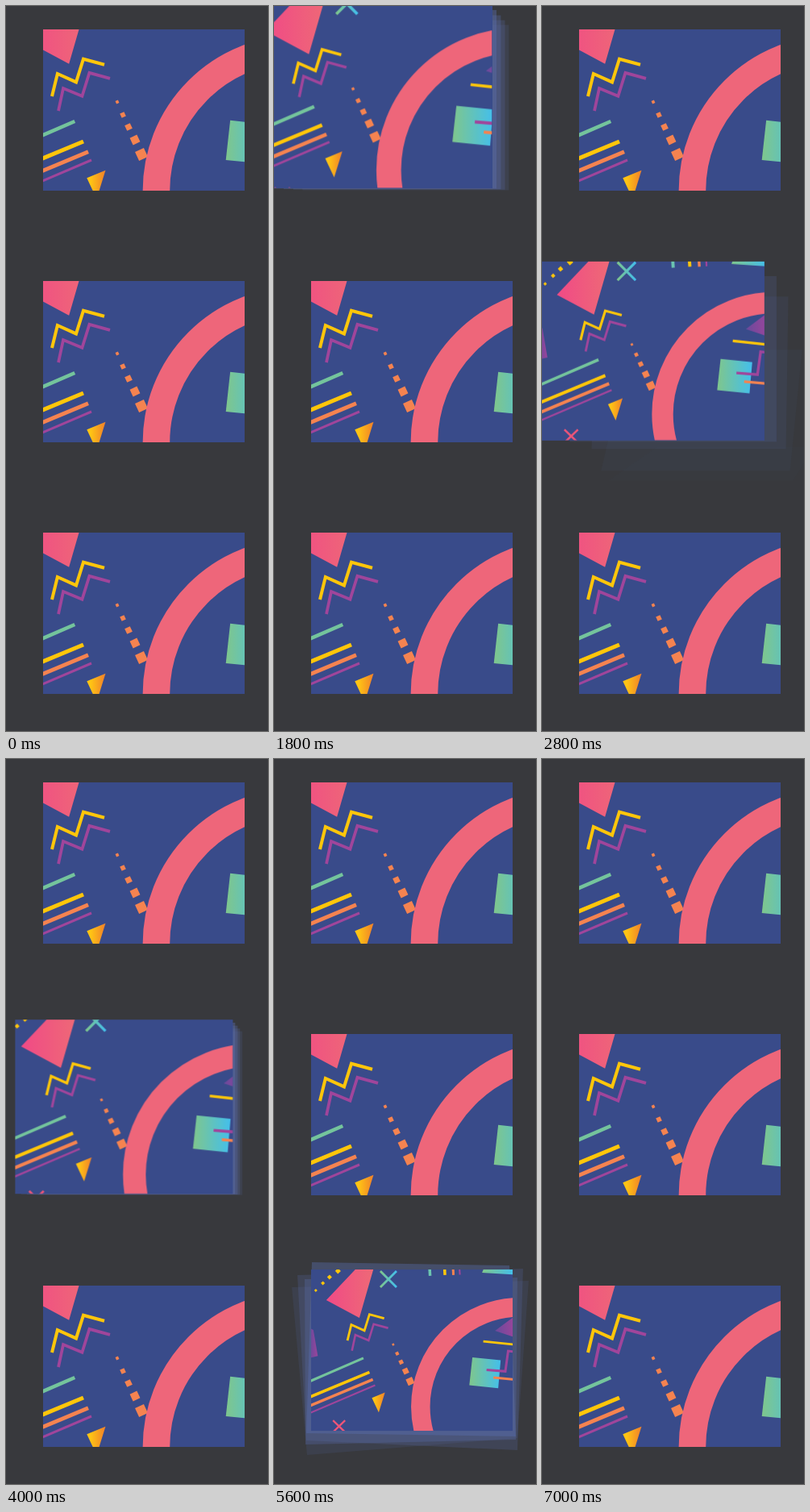
An HTML page for the animation above (7100 ms loop, 325 by 899 pixels).

```html
<!DOCTYPE html>
<html lang="en">
<head>
<meta charset="utf-8">
<title>Stack hover effects</title>
<style>
html, body { margin: 0; width: 100%; height: 100%; overflow: hidden; background: #38393d; }
#stage { position: fixed; inset: 0; overflow: hidden; contain: strict; }
.stack { position: absolute; left: 46px; width: 250px; height: 200px; perspective: 1000px; perspective-origin: 438px 225px; }
.deco, .card { position: absolute; inset: 0; }
.deco { background: #5a6eb0; opacity: 0; }
.card { overflow: hidden; background: #394b8a; }
svg { position: absolute; left: 0; top: 0; display: block; }
.fan { overflow: visible; fill: #5a6eb0; }
.line { fill: none; }
</style>
</head>
<body>
<div id="stage">
<svg width="0" height="0">
  <defs>
    <linearGradient id="pink"><stop stop-color="#f04a86"/><stop offset="1" stop-color="#ee6a76"/></linearGradient>
    <linearGradient id="sea"><stop stop-color="#7fc68c"/><stop offset="1" stop-color="#43bfec"/></linearGradient>
    <linearGradient id="sun"><stop offset=".2" stop-color="#ffc414"/><stop offset="1" stop-color="#f0802a"/></linearGradient>
    <linearGradient id="plum"><stop stop-color="#6a4a9c"/><stop offset="1" stop-color="#9a459b"/></linearGradient>
    <g id="art">
      <path fill="url(#pink)" d="M19 38L55 0 56-4H78.5L77.3 0 60 60Z"/>
      <g id="dots" fill="#ffc60a"></g>
      <g class="line" stroke="#ffc60a" stroke-width="2.8">
        <path d="M45.2 88.1L50 68.5 66.2 75.8 72.5 55.7 90.7 60.6"/>
        <path d="M213.5 89L254 93.3"/>
      </g>
      <g class="line" stroke="#a0459b" stroke-width="2.6">
        <path d="M50.8 100.7L55 81.1 71.4 87.9 77.7 67.7 95.6 72.6"/>
      </g>
      <g id="squares" fill="#f58350"></g>
      <path class="line" stroke="#74c49c" stroke-width="3.2" d="M-5 140L65 109.8"/>
      <path class="line" stroke="#ffc60a" stroke-width="3.5" d="M-5 159.5L72.5 127.3"/>
      <path class="line" stroke="#f58350" stroke-width="3.5" d="M-5 170.3L76.7 136.2"/>
      <path class="line" stroke="#a0459b" stroke-width="2.1" d="M-5 179.5L79.5 143.4"/>
      <path fill="url(#sun)" d="M75.5 159L91.7 152.3 84 177Z"/>
      <path fill="url(#plum)" d="M228 76L252 58V84Z"/>
      <path fill="url(#plum)" d="M-1 73L3 75 8.5 107.3-1 109.5Z"/>
      <circle class="line" cx="259" cy="170" r="123.2" stroke="#ee667a" stroke-width="23.5"/>
      <path fill="url(#sea)" d="M200 109L235 112.5 232 147 196.2 143.4Z"/>
      <path class="line" stroke="#a0459b" stroke-width="3" d="M217.5 124.4L240.8 126.2 244.3 101 254 102"/>
      <path class="line" stroke="#f58350" stroke-width="3" d="M226 134L254 136.5"/>
      <path class="line" stroke="url(#sea)" stroke-width="2.8" d="M86 2L106 22M106 2L86 22"/>
      <path class="line" stroke="#ee5578" stroke-width="2.3" d="M27.3 187L42.3 201.5M42.3 187L27.3 201.5"/>
      <path class="line" stroke="#6cc5b0" stroke-width="3.5" d="M147-2L147.6 8"/>
      <path class="line" stroke="#ffc60a" stroke-width="3.5" d="M165.5-2L166 7"/>
      <path class="line" stroke="#f58350" stroke-width="3" d="M176-2L176.5 7"/>
      <path class="line" stroke="#a0459b" stroke-width="2" d="M184-2L184.5 6.5"/>
      <path fill="url(#sea)" d="M214-1L212 4 251 6.5V-1Z"/>
    </g>
  </defs>
</svg>
</div>
<script>
const LOOP = 7100;
const TINTS = [0.15, 0.22, 0.3, 0.4]; // back layer to front layer
const stage = document.getElementById('stage');
const clamp = x => Math.max(0, Math.min(1, x));
const expo = x => x <= 0 ? 0 : x >= 1 ? 1 : 1 - 2 ** (-10 * x);
// Amount of hover: eases in from start, back out from end.
const amount = (t, start, dur, end) => expo((t - start) / dur) * (1 - expo((t - end) / 1000));

const squares = (id, list, angle) => {
  document.getElementById(id).innerHTML = list.map(([x, y, s]) =>
    `<rect x="${-s / 2}" y="${-s / 2}" width="${s}" height="${s}" transform="translate(${x} ${y}) rotate(${angle})"/>`).join('');
};
squares('dots', [[6, 26, 2.8], [14.8, 17, 3.6], [23, 9.5, 4.3], [33.5, 2, 5]], -42);
squares('squares', [[101.9, 93, 2.6], [106.8, 104.2, 4], [111.7, 114.7, 5.1], [117.3, 125.9, 6.8], [122.9, 138.5, 8.4]], -25);

function makeStack(top, back) {
  const el = document.createElement('div');
  el.className = 'stack';
  el.style.top = top + 'px';
  el.innerHTML = back +
    '<div class="card"><svg width="250" height="200" viewBox="0 0 250 200"><use href="#art"/></svg></div>';
  stage.append(el);
  return {
    decos: [...el.querySelectorAll('.deco, polygon')],
    card: el.querySelector('.card'),
    art: el.querySelector('use')
  };
}
const decoDivs = '<div class="deco"></div>'.repeat(4);
const fan = '<svg class="fan" width="250" height="200">' + '<polygon/>'.repeat(4) + '</svg>';
const rise = makeStack(29, decoDivs);
const fly = makeStack(341, decoDivs);
const spread = makeStack(653, fan);

const zoom = (stack, p) => {
  const k = (1 - 0.3 * p) / 0.7;
  stack.art.setAttribute('transform', `translate(125 100) scale(${k}) translate(-125 -100)`);
};
const place = (el, y, z, tilt) => {
  el.style.transform = z || y || tilt ? `translateY(${y}px) translateZ(${z}px) rotateX(${tilt}deg)` : 'none';
};

// Layers lift towards the viewer, tipping forward on the way.
function drawRise(t) {
  const start = 384;
  const tilt = -10.2 * Math.sin(Math.PI * clamp((t - start) / 500));
  [...rise.decos, rise.card].forEach((el, i) => {
    const p = t > 2400 ? 0 : amount(t, start + 21 * (i + 1), 1000, 1768);
    place(el, p ? -0.1 * tilt : 0, 30 * (i + 1) * p, p ? tilt : 0);
    if (i < 4) el.style.opacity = TINTS[i] * clamp(4 * p);
  });
  zoom(rise, t > 2400 ? 0 : amount(t, start, 1000, 1738));
}

// The card jumps forward and the layers swing in from below after it.
function drawFly(t) {
  const age = t - 2548;
  const p = t > 4700 ? 0 : amount(t, 2548, 500, 3955);
  const lag = clamp((750 - age) / 750) ** 2 * 2.25;
  fly.decos.forEach((el, i) => {
    const k = 4 - i;
    const swing = clamp((130 * k - age + 80) / 400) ** 2;
    if (p) place(el, 165 * swing, (100 - 20 * k) * p - 52 * k * lag, 100 * swing);
    else place(el, 0, 0, 0);
    el.style.opacity = TINTS[i] * clamp(0.55 - 0.11 * k + (age - 250) / 400) * clamp(4 * p);
  });
  place(fly.card, 0, 100 * p, 0);
  zoom(fly, p);
}

// The layers fan out behind the card, back layer first.
const rest = [0, 0, 250, 0, 250, 200, 0, 200];
const fans = [
  [-24, 2, 270, -6, 256, 189, -5, 210],
  [-17, -13, 263, -21, 256, 204, -6, 192],
  [-8, -8, 256, -10, 254, 191, -7, 197],
  [1, -29, 246, -25, 254, 187, -6, 183]
];
function drawSpread(t) {
  spread.decos.forEach((el, i) => {
    const p = amount(t, 4770 + 15 * (3 - i), 1000, 6160);
    el.setAttribute('points', fans[i].map((v, j) => rest[j] + (v - rest[j]) * p).join(' '));
    el.setAttribute('fill-opacity', TINTS[i] * clamp(4 * p));
  });
  const p = t >= 7000 ? 0 : amount(t, 4770, 1000, 6160);
  place(spread.card, -20 * p, 0, 0);
  zoom(spread, p);
}

function frame() {
  // The picture moves in steps of a tenth of a second.
  const t = Math.floor(performance.now() % LOOP / 100) * 100;
  drawRise(t);
  drawFly(t);
  drawSpread(t);
  requestAnimationFrame(frame);
}
frame();
</script>
</body>
</html>
```
